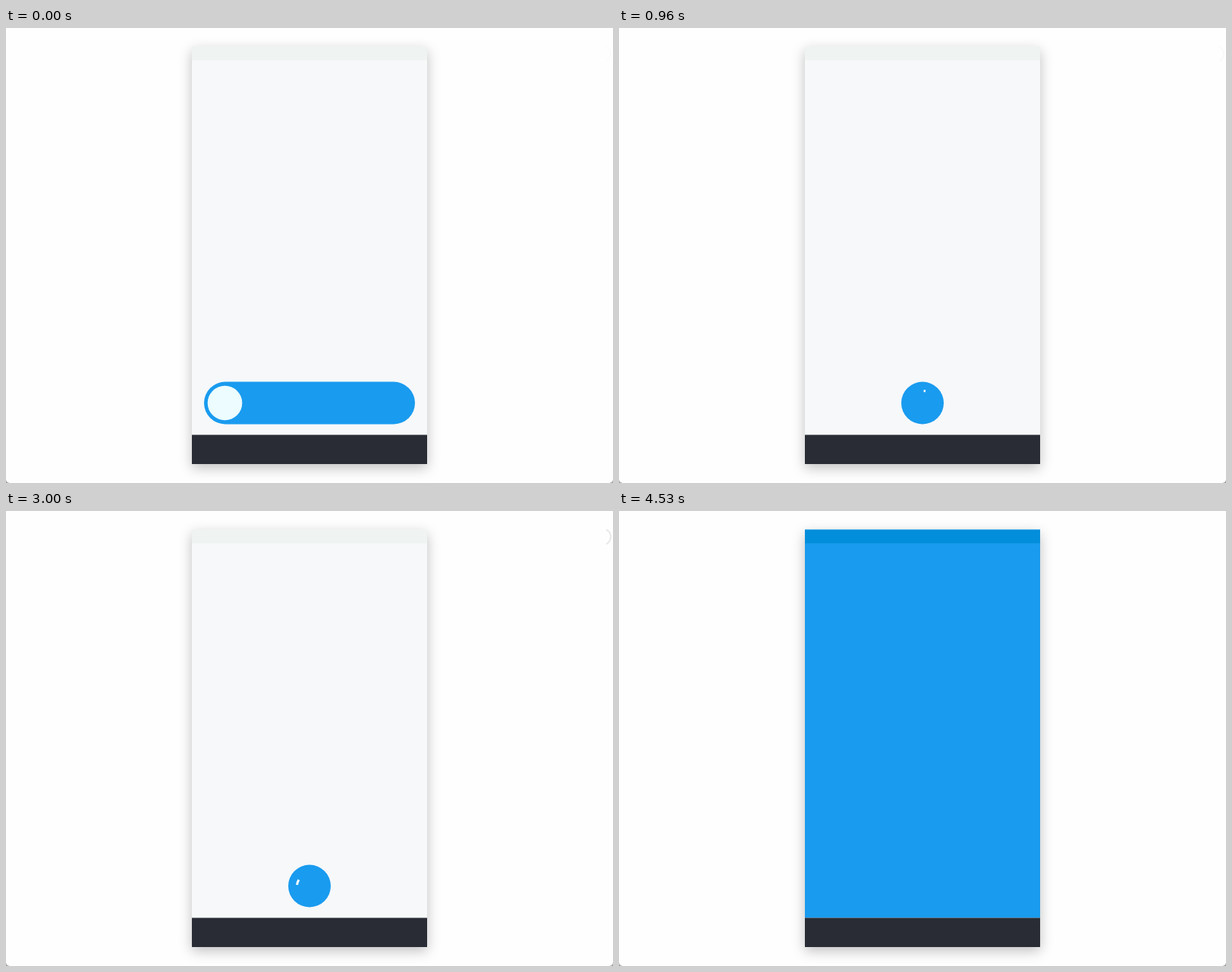
Animation of 800 by 600 pixels, one loop 4.65 s. Source, as an HTML page with a canvas:

```html
<!DOCTYPE html>
<html lang="en">
<head>
<meta charset="utf-8">
<title>Slide to confirm</title>
<style>
  html, body { margin: 0; width: 100%; height: 100%; overflow: hidden; background: #fefefe; }
  canvas { display: block; width: 800px; height: 600px; }
</style>
</head>
<body>
<canvas id="stage" width="800" height="600"></canvas>
<script>
const ctx = document.getElementById('stage').getContext('2d');
const LOOP = 4650, STEP = 30, LAST = 4530;
const BLUE = '#199bef', KNOB = '#ecfcff', DARK = '#292c34';
const PHONE = { x: 245, y: 24.5, w: 310, h: 550.5 };
const CX = 400, CY = 494.5;

// Spinner poses: time, tail and head angle in degrees, clockwise from the right.
const SPIN = [
  [945, -90, -88], [1440, 93, 300], [1830, 318, 430], [2090, 440, 446],
  [2340, 470, 584], [2680, 690, 860], [3000, 907, 932], [3090, 943, 948],
  [3440, 1010, 1190]
];

const clamp = v => Math.max(0, Math.min(1, v));
const mix = (a, b, p) => a + (b - a) * p;
const span = (t, a, b) => clamp((t - a) / (b - a));
const smooth = p => p * p * (3 - 2 * p);
const rad = deg => deg * Math.PI / 180;

// Cubic bezier (.25, .1, .25, 1), solved by bisection.
function ease(p) {
  let lo = 0, hi = 1;
  for (let i = 0; i < 24; i++) {
    const u = (lo + hi) / 2;
    if (0.75 * u * (1 - u) + u ** 3 < p) lo = u; else hi = u;
  }
  const u = (lo + hi) / 2;
  return 0.3 * u * (1 - u) ** 2 + 3 * u * u * (1 - u) + u ** 3;
}

function rect(color, x, y, w, h) {
  ctx.fillStyle = color;
  ctx.fillRect(x, y, w, h);
}

function disc(color, x, y, r) {
  ctx.fillStyle = color;
  ctx.beginPath();
  ctx.arc(x, y, r, 0, 2 * Math.PI);
  ctx.fill();
}

function arc(color, width, x, y, r, from, to) {
  ctx.strokeStyle = color;
  ctx.lineWidth = width;
  ctx.beginPath();
  ctx.arc(x, y, r, rad(from), rad(to));
  ctx.stroke();
}

function drawBackdrop() {
  rect('#a4a4a4', 0, 590, 800, 10);
  ctx.fillStyle = '#fefefe';
  ctx.beginPath();
  ctx.roundRect(0, -10, 800, 610, 5);
  ctx.fill();

  ctx.save();
  ctx.shadowColor = 'rgba(0,0,0,.25)';
  ctx.shadowBlur = 16;
  ctx.shadowOffsetY = 5;
  rect('#f6f8fa', PHONE.x, PHONE.y, PHONE.w, PHONE.h);
  ctx.restore();
  rect('#eff3f2', PHONE.x, PHONE.y, PHONE.w, 18);
}

function drawPill(t) {
  const half = mix(139, 28, ease(span(t, 688, 942)));
  ctx.save();
  ctx.beginPath();
  ctx.roundRect(CX - half, CY - 28, half * 2, 56, 28);
  ctx.fillStyle = BLUE;
  ctx.fill();
  ctx.clip();
  ctx.globalAlpha = 1 - span(t, 665, 725);
  disc(KNOB, mix(288.5, 511.5, smooth(span(t, 195, 665))), CY, 22.8);
  ctx.restore();
}

function drawSpinner(t) {
  const i = SPIN.findIndex(pose => pose[0] > t);
  if (i < 1) return;
  const [t0, tail0, head0] = SPIN[i - 1], [t1, tail1, head1] = SPIN[i];
  const p = span(t, t0, t1);
  ctx.save();
  ctx.globalAlpha = 1 - span(t, 3390, 3440);
  arc('#fff', 3, CX, 495, 16.6, mix(tail0, tail1, p), mix(head0, head1, p));
  ctx.restore();
}

function drawReveal(t) {
  if (t > 3402) disc(BLUE, CX, CY, mix(28, 500, ease(span(t, 3402, 3664))));
}

// Barely visible ring at the stage's top right corner.
function drawRing(t) {
  const leave = span(t, 3900, 4530);
  const alpha = t < 3200 ? mix(0.012, 0.085, span(t, 700, 3000)) : 0.06 * (1 - leave);
  const reach = t < 3200 ? 62 : 48;
  const p = smooth(leave);
  arc(`rgba(0,0,0,${alpha})`, 2, mix(786, 780, p), mix(34, -9, p), 11, -reach, reach);
}

function draw(t) {
  drawBackdrop();
  ctx.save();
  ctx.beginPath();
  ctx.rect(PHONE.x, PHONE.y, PHONE.w, 512);
  ctx.clip();
  drawPill(t);
  drawReveal(t);
  drawSpinner(t);
  ctx.globalAlpha = span(t, 3610, 3750);
  rect('#038edb', PHONE.x, PHONE.y, PHONE.w, 18);
  ctx.restore();
  rect(DARK, PHONE.x, 536.5, PHONE.w, 38.5);
  drawRing(t);
}

const start = performance.now();
function tick() {
  const t = (performance.now() - start) % LOOP;
  draw(Math.min(LAST, Math.floor(t / STEP) * STEP));
  requestAnimationFrame(tick);
}
tick();
</script>
</body>
</html>
```
